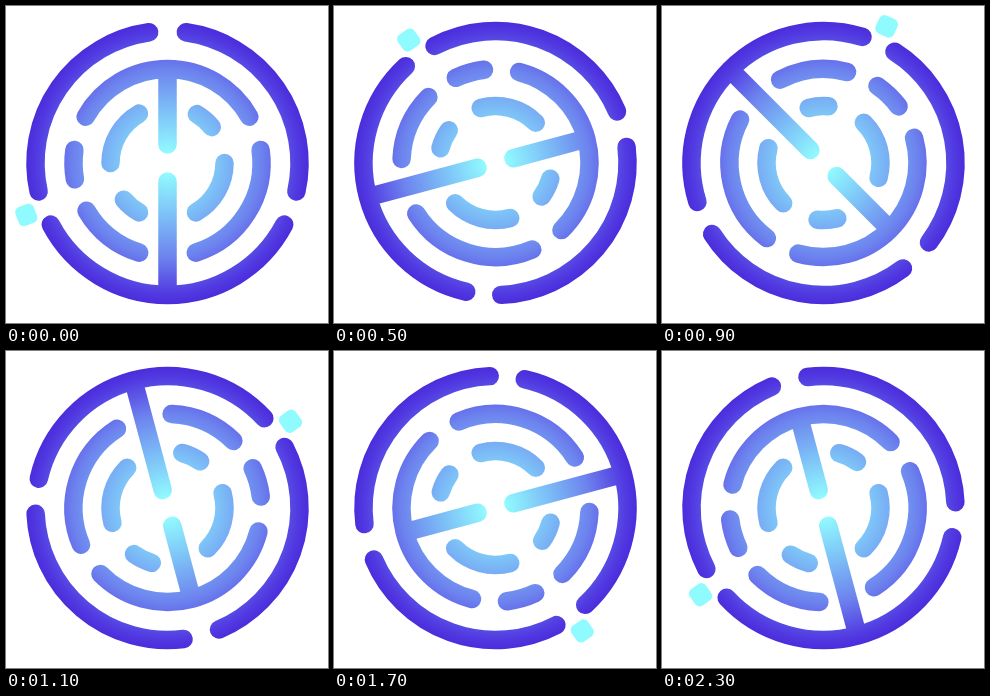
These frames come from a looping animation (322 by 317 pixels, 2.4 s). An HTML page:

```html
<!DOCTYPE html>
<html lang="en">
<head>
<meta charset="utf-8">
<title>Rotating maze</title>
<style>
  html, body { margin: 0; width: 100%; height: 100%; overflow: hidden; background: #fff; }
  svg { display: block; }
</style>
</head>
<body>
<svg width="322" height="317" viewBox="0 0 322 317">
  <defs>
    <radialGradient id="glow" gradientUnits="userSpaceOnUse" cx="0" cy="0" r="141.5">
      <stop offset="0.06" stop-color="#92fdff"/>
      <stop offset="0.4" stop-color="#7bbaf6"/>
      <stop offset="0.665" stop-color="#6d83ee"/>
      <stop offset="0.93" stop-color="#5139e1"/>
      <stop offset="1" stop-color="#4a2cdb"/>
    </radialGradient>
  </defs>
  <g id="maze">
    <path id="walls" fill="none" stroke="url(#glow)" stroke-width="18.5" stroke-linecap="round"/>
    <rect x="-10" y="-160.3" width="20" height="19.6" rx="5.5" fill="#8ffbff" transform="rotate(249.8)"/>
  </g>
</svg>
<script>
  const CENTER = "161.5 157";
  const STEP_MS = 100, STEPS = 24;

  // Each ring: radius and [start, end] angles in degrees, clockwise from the top.
  const rings = [
    { r: 132, arcs: [[8, 102.5], [117.8, 242.2], [257.5, 352]] },
    { r: 94, arcs: [[-60.5, 60.5], [82, 162.5], [197.5, 239.5], [260, 278]] },
    { r: 57, arcs: [[-90, -30], [31, 51], [90, 150], [210, 230]] }
  ];

  function point(r, deg) {
    const a = deg * Math.PI / 180;
    return `${(r * Math.sin(a)).toFixed(2)} ${(-r * Math.cos(a)).toFixed(2)}`;
  }

  function arc(r, from, to) {
    const large = to - from > 180 ? 1 : 0;
    return `M${point(r, from)}A${r} ${r} 0 ${large} 1 ${point(r, to)}`;
  }

  const spokes = "M0 -18.5V-94M0 18.5V132";
  const curves = rings.flatMap(({ r, arcs }) => arcs.map(([from, to]) => arc(r, from, to)));
  document.getElementById("walls").setAttribute("d", curves.join("") + spokes);

  const maze = document.getElementById("maze");

  function render(ms) {
    const step = Math.floor(ms / STEP_MS) % STEPS;
    maze.setAttribute("transform", `translate(${CENTER}) rotate(${step * 360 / STEPS})`);
  }

  const start = performance.now();
  function tick() {
    render(performance.now() - start);
    requestAnimationFrame(tick);
  }
  tick();
</script>
</body>
</html>
```
